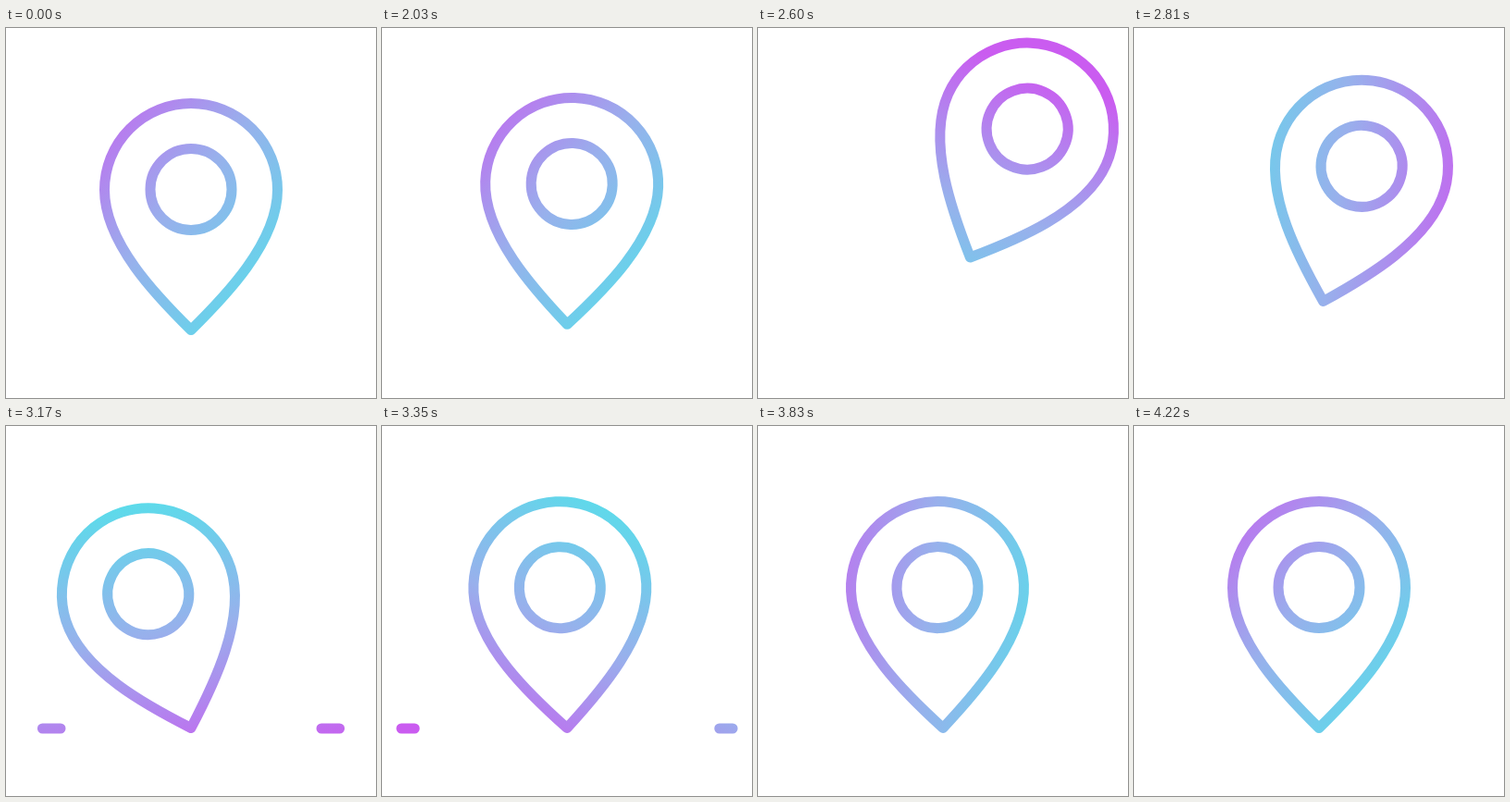
Animation of 400x400 px, one loop 4490 ms. Source, as an HTML page with a canvas:

```html
<!DOCTYPE html>
<html lang="en">
<head>
<meta charset="utf-8">
<title>Bouncing map pin</title>
<style>
  html, body { margin: 0; width: 100%; height: 100%; overflow: hidden; background: #fff; }
  canvas { display: block; }
</style>
</head>
<body>
<canvas id="stage" width="400" height="400"></canvas>
<script>
const ctx = document.getElementById('stage').getContext('2d');
const LOOP = 4490, START = 2000, PEAK = 2600, LAND = 2870, END = 4220, STEP = 30;
const TIP_Y = 326.5, HEAD_Y = -151.5, HEAD_R = 93.5, HOLE_R = 44;

const clamp = u => Math.min(1, Math.max(0, u));
const progress = (t, from, to) => clamp((t - from) / (to - from));
const linear = u => u;
const sineInOut = u => (1 - Math.cos(Math.PI * u)) / 2;
const sineOut = u => Math.sin(u * Math.PI / 2);
const quintInOut = u => u < .5 ? 16 * u ** 5 : 1 - 16 * (1 - u) ** 5;

// Keys are [time, value, easing towards this key].
function track(keys, t) {
  let [t0, v0] = keys[0];
  for (const [t1, v1, ease = linear] of keys) {
    if (t < t1) return v0 + (v1 - v0) * ease(progress(t, t0, t1));
    [t0, v0] = [t1, v1];
  }
  return v0;
}

const tilt = [
  [START, 0], [PEAK, 24, sineOut], [3110, -19, quintInOut],
  [3550, 9.2, sineInOut], [3910, -3.8, sineInOut], [END, 0, sineInOut]
];
const lift = [[START, 0], [PEAK, 78.5, sineOut], [LAND, 0, u => u * u]];
const hue = [
  [START, 40], [2400, 70], [PEAK, 110], [2810, 187],
  [3170, 260], [3590, 345], [END, 400]
];

function gradient(degrees) {
  const a = degrees * Math.PI / 180, dx = Math.cos(a), dy = Math.sin(a);
  const at = d => [200 + dx * d, 200 + dy * d];
  const g = ctx.createLinearGradient(...at(-178), ...at(142));
  ['#ca5cf0', '#98b0ec', '#55e0ea'].forEach((c, i) => g.addColorStop(i / 2, c));
  return g;
}

function pinPath(x, y, degrees) {
  const path = new Path2D(), pin = new Path2D();
  pin.moveTo(0, 0);
  pin.bezierCurveTo(-37, -36.5, -HEAD_R, -94.5, -HEAD_R, HEAD_Y);
  pin.arc(0, HEAD_Y, HEAD_R, Math.PI, 0);
  pin.bezierCurveTo(HEAD_R, -94.5, 37, -36.5, 0, 0);
  pin.closePath();
  pin.moveTo(HOLE_R, HEAD_Y - .5);
  pin.arc(0, HEAD_Y - .5, HOLE_R, 0, 2 * Math.PI);
  path.addPath(pin, new DOMMatrix().translate(x, y).rotate(degrees));
  return path;
}

function drawDashes(t) {
  if (t < LAND + STEP || t >= 3620) return;
  const reach = duration => 180 - 103 * (1 - progress(t, LAND, LAND + duration)) ** 2;
  const inner = reach(780), outer = reach(530);
  ctx.beginPath();
  for (const side of [-1, 1]) {
    ctx.moveTo(200 + side * inner, 327);
    ctx.lineTo(200 + side * outer, 327);
  }
  ctx.stroke();
}

function draw(now) {
  const t = Math.floor((now % LOOP + 10) / STEP) * STEP - 10;
  ctx.fillStyle = '#fff';
  ctx.fillRect(0, 0, 400, 400);
  ctx.lineWidth = 11;
  ctx.lineCap = ctx.lineJoin = 'round';
  ctx.strokeStyle = gradient(track(hue, t));
  const height = track(lift, t);
  ctx.stroke(pinPath(200 + height * height / 210, TIP_Y - height, track(tilt, t)));
  drawDashes(t);
}

const begin = performance.now();
function frame() {
  draw(performance.now() - begin);
  requestAnimationFrame(frame);
}
frame();
</script>
</body>
</html>
```
